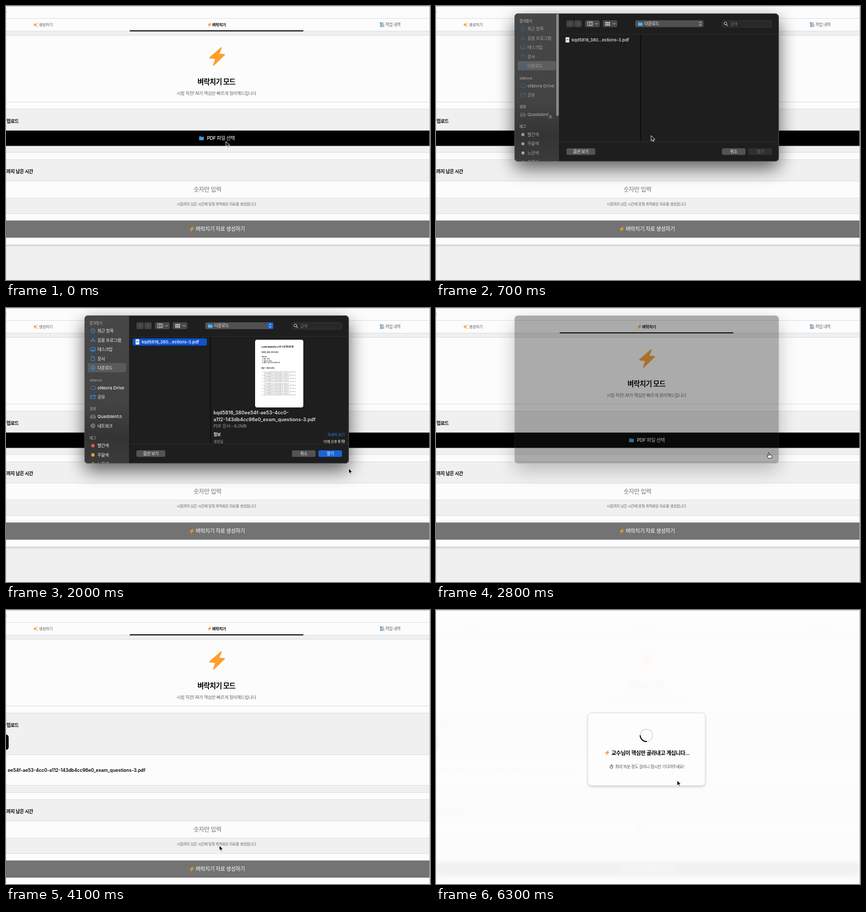
An HTML page for the animation above (6400 ms loop, 800x518 px).

```html
<!DOCTYPE html>
<html lang="ko">
<head>
<meta charset="utf-8">
<title>벼락치기 모드</title>
<style>
html, body { margin: 0; width: 100%; height: 100%; overflow: hidden; background: #fcfcfc; }
svg { display: block; width: 800px; height: 518px; }
text { font-family: Inter, "Noto Sans CJK KR", "Noto Sans CJK", sans-serif; white-space: pre; }
.ko { letter-spacing: -.04em; }
</style>
</head>
<body>
<svg id="stage" viewBox="0 0 800 518" xmlns="http://www.w3.org/2000/svg"></svg>
<script>
const LOOP = 6400, STEP = 100, SHIFT = 68;
const T = { open: 300, active: 800, pick: 1500, close: 2700, attach: 3000, focus: 4400, typed: 5100, load: 5700 };

// ---- drawing helpers ----
const rect = (x, y, w, h, fill, extra = '') =>
  `<rect x="${x}" y="${y}" width="${w}" height="${h}" fill="${fill}" ${extra}/>`;
const round = (x, y, w, h, r, fill, extra = '') => rect(x, y, w, h, fill, `rx="${r}" ${extra}`);
const path = (d, stroke, w = 1, extra = '') =>
  `<path d="${d}" fill="none" stroke="${stroke}" stroke-width="${w}" stroke-linecap="round" stroke-linejoin="round" ${extra}/>`;
const shape = (d, fill, extra = '') => `<path d="${d}" fill="${fill}" ${extra}/>`;
const circle = (x, y, r, fill, extra = '') => `<circle cx="${x}" cy="${y}" r="${r}" fill="${fill}" ${extra}/>`;
const hline = (y, c = '#dedede') => rect(0, y, 800, 1, c);
const group = (id, body, extra = '') => `<g id="${id}" ${extra}>${body}</g>`;
// text placed by its vertical middle
const text = (x, mid, size, str, fill = '#000', weight = 400, anchor = 'start') => {
  const ko = /[가-힣]/.test(str) ? 'class="ko"' : '';
  return `<text ${ko} x="${x}" y="${(mid + size * .36).toFixed(2)}" font-size="${size}" fill="${fill}" font-weight="${weight}" text-anchor="${anchor}">${str}</text>`;
};
const bolt = (x, y, k, extra = '') =>
  `<path transform="translate(${x} ${y}) scale(${k})" d="M8-16.5-14 2.3-2.5 3.6-6.5 16.5 14-3.6 3-4.7Z" fill="#fb9f2c" stroke="#fb9f2c" stroke-width="2" stroke-linejoin="round" ${extra}/>`;
const star = (x, y, r) =>
  shape(`M${x} ${y - r}Q${x + r * .2} ${y - r * .2} ${x + r} ${y}Q${x + r * .2} ${y + r * .2} ${x} ${y + r}Q${x - r * .2} ${y + r * .2} ${x - r} ${y}Q${x - r * .2} ${y - r * .2} ${x} ${y - r}Z`, '#f6a63a');
const folder = (x, y, c = '#3f9fe0') =>
  shape(`M${x} ${y}h3l1 1h4.6v6.6h-8.6z`, '#2a7cba') + rect(x, y + 2.2, 8.6, 5.4, c, 'rx=".7"');
const books = (x, y) =>
  round(x, y, 7, 2.4, .6, '#4b78c4') + rect(x + 2, y + .6, 5, 1.2, '#f4efe0') +
  round(x + 1, y + 2.9, 7, 2.4, .6, '#5d9c63') + rect(x + 3, y + 3.5, 5, 1.2, '#f4efe0') +
  round(x + .5, y + 5.8, 8, 2.4, .6, '#4b62b0') + rect(x + 2.5, y + 6.4, 6, 1.2, '#f4efe0');

// ---- web page ----
const FILE_TAIL = 'a112-143db4cc96e0_exam_questions-3.pdf';

function pageTop() {
  return rect(0, 0, 800, 518, '#fcfcfc') + rect(0, 9, 1, 4, '#d9b46c') +
    hline(23) + hline(47) +
    star(55, 35.5, 3.8) + star(58.8, 32.3, 1.5) + star(58.8, 38.4, 1.5) +
    text(62, 35, 7.4, '생성하기', '#5a5a5a') +
    bolt(384, 35.3, .24) + text(389, 35, 7.4, '벼락치기', '#000', 600) +
    books(705.5, 31) + text(716, 35, 7.5, '작업 내역', '#5a5a5a') +
    rect(0, 48, 800, 7, '#f0f0f0') + hline(55) +
    rect(233.5, 46, 327.5, 2, '#0a0a0a') +
    bolt(398.2, 95.6, 1) +
    text(397, 143.5, 13.1, '벼락치기 모드', '#000', 700, 'middle') +
    text(397, 165.5, 8.25, '시험 직전! AI가 핵심만 빠르게 정리해드립니다', '#666', 400, 'middle') +
    hline(181) +
    `<rect id="upload" x="0" y="195" width="800" height="82" fill="#f0f0f0"/>` + hline(194.5) +
    text(24, 217.5, 8.7, 'PDF 파일 업로드', '#000', 600, 'end') +
    group('wide', rect(0, 235.5, 800, 29, '#000') + folder(364.5, 246) +
      text(379, 250, 9.1, 'PDF 파일 선택', '#fff', 500)) +
    group('chosen', round(-60, 235.5, 65, 29, 5, '#000') +
      rect(0, 273, 800, 59, '#fcfcfc') + hline(273) + hline(331) +
      text(263, 302.5, 8.6, 'ee54f-ae53-4cc0-' + FILE_TAIL, '#000', 600, 'end'));
}

function pageForm() {
  return rect(0, 277, 800, 13, '#fcfcfc') + hline(276.5) +
    rect(0, 290, 800, 103, '#f0f0f0') + hline(290) +
    text(51, 313, 8.8, '시험까지 남은 시간', '#000', 600, 'end') +
    rect(0, 331, 800, 32, '#fcfcfc') +
    group('edges', rect(0, 330.5, 800, 1, 'inherit') + rect(0, 362.5, 800, 1, 'inherit')) +
    group('hint', text(380, 347, 11.3, '숫자만 입력', '#757575', 400, 'middle')) +
    group('value', text(380, 347.5, 11.3, '3', '#000', 500, 'middle')) +
    `<rect id="caret" y="340" width="1" height="14" fill="#000"/>` +
    text(397, 375, 6.9, '시험까지 남은 시간에 맞춰 최적화된 자료를 생성합니다', '#666', 400, 'middle') +
    rect(0, 393, 800, 58, '#fcfcfc') + hline(392) +
    `<rect id="make" x="0" y="405.5" width="800" height="32.5"/>` +
    group('makeBolt', bolt(350.5, 421.7, .3)) +
    text(358, 421.7, 10, '벼락치기 자료 생성하기', '#fff', 500) +
    rect(0, 451, 800, 150, '#f0f0f0') + rect(0, 451, 800, 5, 'url(#under)');
}

// ---- file dialog ----
const icons = {
  clock: (y, c) => circle(164, y, 3.9, 'none', `stroke="${c}"`) + path(`M164 ${y - 2}v2.2h1.8`, c, .8),
  apps: (y, c) => path(`M160.5 ${y + 3.4}l3.5-6.8 3.5 6.8M159.8 ${y + 1}h8.4`, c, 1),
  desk: (y, c) => round(159.6, y - 3.6, 8.8, 6.2, 1, 'none', `stroke="${c}"`) + path(`M161.5 ${y + 4}h5M160.5 ${y + 1}h7`, c, .8),
  doc: (y, c) => path(`M161.2 ${y - 4}h3.6l2.2 2.3v5.7h-5.8zM164.5 ${y - 4}v2.6h2.5`, c, .9),
  down: (y, c) => circle(164, y, 3.9, 'none', `stroke="${c}"`) + path(`M164 ${y - 2}v3.8m-1.6-1.5l1.6 1.6 1.6-1.6`, c, .9),
  cloud: (y, c) => path(`M161.5 ${y + 3}a2.3 2.3 0 0 1-.3-4.4 3 3 0 0 1 5.6-.6 2.5 2.5 0 0 1 .4 5z`, c, .9),
  share: (y, c) => path(`M159.8 ${y - 3}h2.6l.9 1h4.8v5.2h-8.3zM159.8 ${y - 1}h4`, c, .9) + circle(167, y - 2.4, 1.5, c),
  drive: (y, c) => path(`M161 ${y - 2.8}h6l1.4 3v2.6h-8.8v-2.6zM159.8 ${y + .2}h8.4`, c, .9),
  globe: (y, c) => circle(164, y, 3.8, 'none', `stroke="${c}" stroke-width=".9"`) +
    path(`M160.3 ${y}h7.4M164 ${y - 3.7}q-3.4 3.7 0 7.4q3.4-3.7 0-7.4`, c, .7)
};

function sidebar(on) {
  const blue = on ? '#3296ee' : '#2b6a9e', ink = on ? '#eee' : '#a2a2a2', head = on ? '#929292' : '#9a9a9a';
  const gray = on ? '#a5a5a5' : '#858585';
  const item = (icon, y, label, c = blue) => icons[icon](y, c) + text(172.5, y, 8.1, label, ink, 500);
  const title = (y, label) => text(157.5, y, 6.8, label, head, 600);
  const tag = (y, c, label) => circle(164, y, on ? 3.2 : 2.9, c) + text(172.5, y, 8.1, label, ink, 500);
  const d = on ? 17.3 : 0;
  const eject = on ? 205.5 : 209.5;
  const hues = on ? ['#ff514b', '#ff9d2e', '#ffd23c', '#3fc95a'] : ['#a99a96', '#b5947c', '#b9a88a', '#8fa58d'];
  return title(28.5, '즐겨찾기') +
    round(154, 104, 72.5, 17.5, 4, on ? '#5a5a5a' : '#5e5e5e') +
    item('clock', 43.3, '최근 항목') + item('apps', 60.8, '응용 프로그램') + item('desk', 78.2, '데스크탑') +
    item('doc', 95.6, '문서') + item('down', 113, '다운로드') +
    title(136.8, 'oNevra') + item('cloud', 150.7, 'oNevra Drive') + item('share', 168, '공유') +
    title(190.5, '위치') + item('drive', 205.5, 'Quadolent', gray) +
    shape(`M216 ${eject - 3.5}l3 3.6h-6zM213 ${eject + 1.2}h6v1.2h-6z`, gray) +
    (on ? item('globe', 222.8, '네트워크', gray) : '') +
    title(228 + d, '태그') +
    ['빨간색', '주황색', '노란색', '초록색'].map((s, i) => tag(243 + d + i * 17.4, hues[i], s)).join('') +
    (on ? '' : round(227, 15, 4.5, 193, 2.2, '#8c8c8c'));
}

function toolbar() {
  const c = '#d8d8d8';
  let grid = '';
  for (let i = 0; i < 6; i++) grid += rect(319.5 + i % 3 * 3.2, 30.2 + (i / 3 | 0) * 4, 2.4, 3, c);
  return round(246, 27, 14, 13, 3, '#424242') + round(261, 27, 14, 13, 3, '#424242') +
    path('M254 31l-2.4 2.6 2.4 2.6M267 31l2.4 2.6-2.4 2.6', '#7d7d7d', 1) +
    round(281, 27, 28, 13, 3, '#484848') + round(314.5, 27, 27.5, 13, 3, '#484848') +
    path('M286.500 30h9v7h-9zM289.500 30v7M292.500 30v7', c, .9) + grid +
    path('M301 32.600l2 2 2-2M334 32.600l2 2 2-2', c, 1) +
    round(376, 27, 128.5, 13, 3, '#505050') + folder(381, 29.6, '#4fb0f0') +
    text(393, 33.5, 8, '다운로드', '#f0f0f0', 500) +
    group('knob', round(493, 27.500, 11, 12, 3, '#1b62d2')) +
    path('M496.800 32l1.800-2 1.800 2M496.800 35l1.800 2 1.800-2', '#fff', 1) +
    round(539.5, 27.5, 94, 12.5, 3, '#282828', 'stroke="#3d3d3d" stroke-width=".8"') +
    circle(546, 33, 2.6, 'none', 'stroke="#ccc"') + path('M548 35l2.200 2.200', '#ccc', 1.1) +
    text(555, 33.700, 7.800, '검색', '#777');
}

function preview() {
  const ink = '#222';
  let s = round(470, 60, 91, 128, 4, '#fff') +
    text(482, 73.5, 4.1, 'Lunar Basketry 5.1장 시험 예상문제', ink, 700) +
    text(482, 83.5, 3.2, '정의적, 쉽게, 신속히 정리', ink, 600) +
    text(482, 92, 2.700, '시험 개요', ink, 600);
  for (let i = 0; i < 3; i++)
    s += circle(484, 96.5 + i * 3.5, .7, ink) + text(486, 96.5 + i * 3.5, 2.4, ['총점: 100점', '시험 시간: 90분', '문항 수: 주관식 5개, 객관식 10개'][i], ink, 600);
  s += text(482, 113.5, 3.2, '예상 1. 객관식 문제', ink, 600);
  for (let i = 0; i < 15; i++)
    s += (i % 2 ? '' : text(483, 121 + i * 3.1, 2.2, (i / 2 + 1) + '.', '#555')) +
      text(486, 121 + i * 3.1, 2.25, ['다음 중 시장 환경과 전략에 대한 설명으로 가장 알맞은 것을 고르시오', '그 이유를 함께 쓰시오 그리고 예시를 하나 이상 드시오'][i % 2], '#666');
  return s +
    text(391.500, 197.5, 9.15, 'kqd5816_380ee54f-ae53-4cc0-', '#dedede', 600) +
    text(391.500, 210.5, 9.15, FILE_TAIL, '#dedede', 600) +
    text(391.500, 223.5, 8.2, 'PDF 문서 – 6.2MB', '#989898') +
    text(391.500, 239, 7.600, '정보', '#eee', 700) + text(639, 239, 7, '자세히 보기', '#2f80e8', 400, 'end') +
    text(391.500, 253, 6.9, '생성일', '#a0a0a0', 500) + text(639, 253, 6.9, '어제 오후 6:19', '#eee', 500, 'end');
}

function dialog() {
  const button = (x, w, label, fill, ink) =>
    round(x, 269, w, 12.500, 3, fill) + text(x + w / 2, 275, 7.8, label, ink, 500, 'middle');
  const row = ink => round(244.5, 59, 7, 10, 1, '#f2f2f2') + rect(246, 62, 4, 3, '#9aa7b5') +
    text(256, 64, 7.95, 'kqd5816_380...estions-3.pdf', ink, 500);
  return round(148, 14, 499, 280, 8, '#000', 'filter="url(#soft)" opacity=".62" transform="translate(0 13)"') +
    round(148, 14, 499, 280, 7, '#1e1e1e') +
    group('inside',
      shape('M233 14H155a7 7 0 0 0-7 7V287a7 7 0 0 0 7 7H233z', 'url(#side)') +
      `<g clip-path="url(#sideClip)">${group('idle', sidebar(false))}${group('live', sidebar(true))}</g>` +
      rect(232.5, 14, 1, 280, '#111') + toolbar() +
      rect(233.5, 53, 413, 1, '#2b2b2b') + rect(385.5, 54, 1.2, 202, '#050505') + rect(233.5, 256, 413, 1, '#2f2f2f') +
      group('plainRow', row('#e4e4e4')) +
      group('picked', round(239, 57.5, 140, 13.5, 3, '#0d53cc') + row('#fff') + `<g clip-path="url(#viewClip)">${preview()}</g>`) +
      button(246, 54.5, '옵션 보기', '#535353', '#eee') + button(539.5, 44.5, '취소', '#535353', '#eee') +
      group('openOff', button(589.5, 44.5, '열기', '#303030', '#6c6c6c')) +
      group('openOn', button(589.5, 44.5, '열기', '#1b64d6', '#fff'))) +
    round(148.500, 14.500, 498, 279, 7, 'none', 'stroke="#5c5c5c" stroke-width=".8"');
}

// ---- waiting card ----
function loader() {
  return rect(0, 0, 800, 518, '#fdfdfd', 'opacity=".95"') +
    round(287, 195, 221, 137, 7, '#000', 'filter="url(#lift)" opacity=".2" transform="translate(0 2)"') +
    round(286.5, 194.5, 221.5, 137.5, 7, '#fdfdfd', 'stroke="#dcdcdc"') +
    circle(397, 237, 11.7, 'none', 'stroke="#dcdcdc" stroke-width="1.8"') +
    path('M388.730 228.730A11.700 11.700 0 0 1 405.270 228.730', '#000', 1.8, 'id="spin"') +
    bolt(323, 269.8, .28) +
    text(331, 270, 10.05, '교수님이 핵심만 골라내고 계십니다...', '#000', 600) +
    circle(331, 296.8, 2.7, 'none', 'stroke="#444" stroke-width=".9"') +
    path('M331 297l1.200-1.200M330 292.800h2M331 293v1M333.500 293.800l.600.600', '#444', .9) +
    text(338, 296.3, 7.5, '최대 15분 정도 걸리니 잠시만 기다려주세요!', '#555');
}

const fade = (id, rows) => `<linearGradient id="${id}" x1="0" y1="0" x2="0" y2="1">${rows.map(([o, c, a = 1]) => `<stop offset="${o}" stop-color="${c}" stop-opacity="${a}"/>`).join('')}</linearGradient>`;
const blur = (id, s) => `<filter id="${id}" x="-30%" y="-40%" width="160%" height="180%"><feGaussianBlur stdDeviation="${s}"/></filter>`;

document.getElementById('stage').innerHTML =
  `<defs>${fade('under', [[0, '#000', .14], [1, '#000', 0]])}
  ${fade('side', [[0, '#474747'], [.6, '#434343'], [.82, '#343434'], [1, '#3b3b3b']])}
  ${blur('soft', 17)}${blur('lift', 2.5)}${blur('haze', 4)}
  <clipPath id="sideClip"><rect x="148" y="14" width="85" height="279.5"/></clipPath>
  <clipPath id="viewClip"><rect x="386" y="54" width="260" height="202"/></clipPath></defs>` +
  group('page', pageTop() + group('form', pageForm())) +
  group('dialog', dialog()) + group('loader', loader()) +
  rect(0, 0, 800, 1, '#bcbcbc') + rect(799, 0, 1, 518, '#b8b8b8') + rect(0, 0, 1, 518, '#000', 'opacity=".07"') +
  group('arrow', '<path d="M0 0V10L2.300 7.900 3.900 11.400 5.400 10.700 3.900 7.400 7 7.200Z" fill="#000" stroke="#fff" stroke-width=".9" stroke-linejoin="round"/>') +
  group('hand', '<path d="M-1 0.800Q0-.800 1 .800V4.300Q2.400 3.500 3 4.700 4.300 4.200 4.700 5.400 6 5.300 6 6.800L5.200 11H-.800L-3.600 6.900Q-3.600 5.300-1 6.700Z" fill="#fff" stroke="#111" stroke-width=".9" stroke-linejoin="round"/><path d="M1 4.300V6M3 4.700V6.300" stroke="#111" stroke-width=".7"/>') +
  group('beam', path('M-2-6Q0-6 0-4.500Q0-6 2-6M0-4.500V4.500M-2 6Q0 6 0 4.500Q0 6 2 6', '#222', 1));

// ---- motion ----
const el = {};
document.querySelectorAll('[id]').forEach(n => el[n.id] = n);
const show = (id, on) => el[id].setAttribute('display', on ? 'inline' : 'none');
const set = (id, k, v) => el[id].setAttribute(k, v);
const ramp = (t, a, b) => Math.min(1, Math.max(0, (t - a) / (b - a)));

// time, x, y of the pointer tip
const route = [
  [0, 415, 256], [300, 415, 256], [700, 406, 245], [1300, 312, 66], [1600, 312, 66], [2000, 646.5, 303],
  [2400, 628, 273], [3100, 628, 273], [3600, 440, 500], [4100, 402.5, 445], [4300, 392, 416],
  [5200, 392, 416], [5500, 425, 490], [5700, 425, 490], [6300, 455, 322], [6400, 455, 322]
];
function pointer(t) {
  const i = route.findIndex((p, n) => n && t <= p[0]);
  const [a, b] = [route[i - 1], route[i]];
  const k = ramp(t, a[0], b[0]), e = k * k * (3 - 2 * k);
  return [a[1] + (b[1] - a[1]) * e, a[2] + (b[2] - a[2]) * e];
}

function render(t) {
  const attached = t >= T.attach, focused = t >= T.focus, typed = t >= T.typed, loading = t >= T.load;
  const live = t >= T.active, picked = t >= T.pick;

  set('upload', 'height', attached ? 82 + SHIFT : 82);
  set('form', 'transform', `translate(0 ${attached ? SHIFT : 0})`);
  show('wide', !attached);
  show('chosen', attached);
  set('edges', 'fill', focused ? '#111' : '#dedede');
  show('hint', !typed);
  show('value', typed);
  const since = t - (typed ? T.typed : T.focus);
  show('caret', focused && since % 1000 < 500);
  set('caret', 'x', typed ? 383.3 : 380);
  const ready = ramp(t, T.typed - 40, T.typed + 110);
  set('make', 'fill', `rgb(${Array(3).fill(Math.round(115 - 103 * ready))})`);
  set('makeBolt', 'opacity', .8 + .2 * ready);

  const shown = t < T.close ? ramp(t, T.open, T.open + 200) : t < T.close + 100 ? .8 : t < T.close + 200 ? .36 : 0;
  show('dialog', shown > 0);
  set('dialog', 'opacity', shown);
  show('inside', t <= T.close);
  show('idle', !live);
  show('live', live);
  show('knob', live);
  show('plainRow', !picked);
  show('picked', picked);
  show('openOff', !picked);
  show('openOn', picked);

  show('loader', loading);
  if (loading) el.page.setAttribute('filter', 'url(#haze)');
  else el.page.removeAttribute('filter');
  set('spin', 'transform', `rotate(${((t - T.load + 20) * .36).toFixed(1)} 397 237)`);

  const [x, y] = pointer(t);
  const hand = (t > T.close && t < 3200) || (t >= 5400 && !loading);
  const beam = t >= 4200 && !typed;
  const hidden = typed && t < 5300;
  const kind = hidden ? '' : hand ? 'hand' : beam ? 'beam' : 'arrow';
  for (const k of ['arrow', 'hand', 'beam']) {
    show(k, k === kind);
    set(k, 'transform', `translate(${x.toFixed(1)} ${y.toFixed(1)})`);
  }
}

const start = performance.now();
function tick() {
  const t = (performance.now() - start) % LOOP;
  render(Math.floor(t / STEP) * STEP);
  requestAnimationFrame(tick);
}
tick();
</script>
</body>
</html>
```
